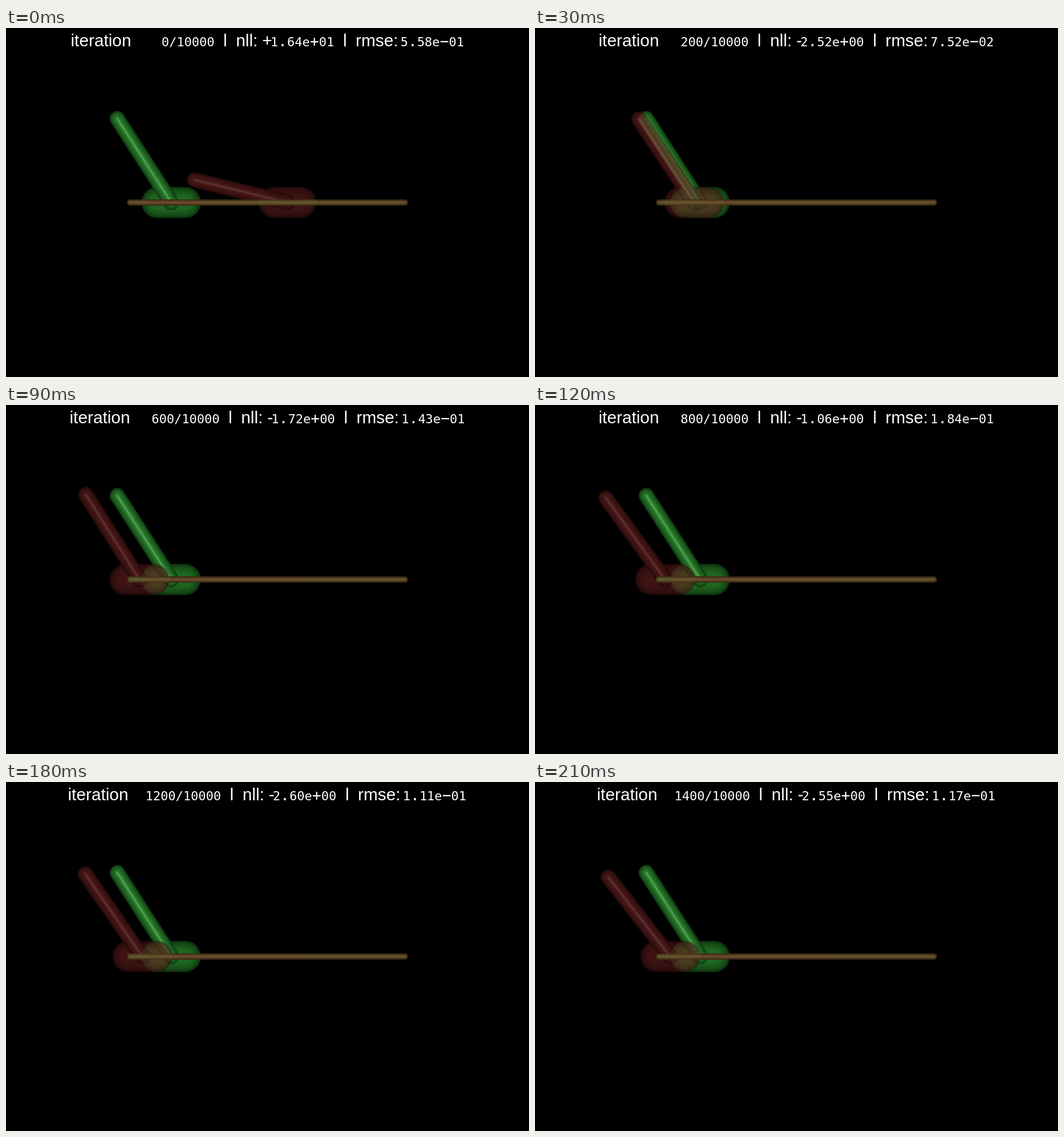
Write an HTML page that moves like this. It is 917 by 611 pixels and loops after 1.24 s.

```html
<!DOCTYPE html>
<html lang="en">
<head>
<meta charset="utf-8">
<title>Cart and pole fit</title>
<style>
  html, body { margin: 0; width: 100%; height: 100%; overflow: hidden; background: #000; }
  svg { display: block; width: 100vw; height: 100vh; }
  text { font: 29.8px "Liberation Sans", Arial, sans-serif; fill: #fff; white-space: pre; }
  .digit { font: 22px "DejaVu Sans Mono", monospace; }
  .mark { font: 26.5px "DejaVu Sans Mono", monospace; }
</style>
</head>
<body>
<svg id="stage" viewBox="0 0 917 611"></svg>
<script>
const stage = document.getElementById('stage');
const STEP = 30, LOOP = 1240, BASE_Y = 305.5;

// Red cart centre, pole tip, and the two printed errors for each step.
const steps = [
  [493.5, 330.5, 265.8, '+1.64e+01', '5.58e−01'],
  [279, 182, 159.5, '-2.52e+00', '7.52e−02'],
  [240, 155.5, 151.5, '-2.37e+00', '1.02e−01'],
  [234, 140, 157, '-1.72e+00', '1.43e−01'],
  [228, 124.5, 163, '-1.06e+00', '1.84e−01'],
  [241, 149.5, 155.8, '-2.66e+00', '1.05e−01'],
  [239, 139, 161, '-2.60e+00', '1.11e−01'],
  [237, 128.5, 166.8, '-2.55e+00', '1.17e−01']
];

// Shades run from the rim to the axis: [position, r, g, b].
const green = {
  cart: [[0, 12, 48, 14], [.2, 21, 75, 23], [.55, 30, 99, 32], [1, 35, 110, 37]],
  pole: [[0, 14, 54, 16], [.3, 27, 89, 29], [.7, 37, 114, 39], [.87, 48, 130, 50], [1, 84, 160, 84]]
};
const red = {
  cart: [[0, 50, 15, 15], [.2, 82, 25, 25], [.55, 102, 31, 31], [1, 112, 35, 35]],
  pole: [[0, 58, 17, 17], [.3, 94, 29, 29], [.7, 114, 36, 36], [.87, 127, 50, 50], [1, 155, 86, 86]]
};
const brown = [[0, 48, 36, 17], [.35, 75, 57, 28], [.65, 86, 67, 35], [1, 110, 88, 52]];

function add(parent, tag, attrs = {}) {
  const node = document.createElementNS('http://www.w3.org/2000/svg', tag);
  for (const key in attrs) node.setAttribute(key, attrs[key]);
  return parent.appendChild(node);
}

function shade(stops, u) {
  let i = 1;
  while (i < stops.length - 1 && stops[i][0] < u) i++;
  const a = stops[i - 1], b = stops[i];
  const k = (u - a[0]) / (b[0] - a[0]);
  return `rgb(${[1, 2, 3].map(c => Math.round(a[c] + (b[c] - a[c]) * k))})`;
}

// A lit rod: nested round strokes from the dark rim to the bright axis.
function capsule(parent, radius, stops, layers) {
  const g = add(parent, 'g', { 'stroke-linecap': 'round' });
  for (let i = 0; i < layers; i++) {
    const u = i / (layers - 1);
    add(g, 'line', { 'stroke-width': 2 * radius * (1 - u * .94), stroke: shade(stops, u) });
  }
  return (x1, y1, x2, y2) => {
    for (const line of g.children) {
      line.setAttribute('x1', x1);
      line.setAttribute('y1', y1);
      line.setAttribute('x2', x2);
      line.setAttribute('y2', y2);
    }
  };
}

const halfWidth = x => 50.5 + (493.5 - x) * .0075;

function cartPole(colors, opacity) {
  const g = add(stage, 'g', { opacity });
  const cart = capsule(g, 27.3, colors.cart, 28);
  const pole = capsule(g, 13.5, colors.pole, 18);
  return (x, tipX, tipY) => {
    const reach = halfWidth(x) - 27.3;
    cart(x - reach, BASE_Y, x + reach, BASE_Y);
    pole(x, BASE_Y, tipX, tipY);
  };
}

function tint(fill) {
  const rect = add(stage, 'rect', { y: 300.5, height: 10, fill, opacity: .15 });
  return x => {
    const left = Math.max(213, x - halfWidth(x));
    rect.setAttribute('x', left);
    rect.setAttribute('width', x + halfWidth(x) - left);
  };
}

const drawTruth = cartPole(green, 1);
const drawGuess = cartPole(red, .6);
capsule(stage, 5.5, brown, 10)(217.5, BASE_Y, 699.5, BASE_Y);
const tintTruth = tint('#7a3028');
const tintGuess = tint('#667040');
drawTruth(289.7, 195.2, 158.8);
tintTruth(289.7);

const label = (content, anchor = 'start') => {
  const node = add(stage, 'text', { y: 32, 'text-anchor': anchor });
  node.textContent = content;
  return node;
};
const title = label('iteration'), count = label('', 'end');
const bar1 = label('l', 'middle'), nll = label('nll:'), sign = label(''), nllValue = label('', 'end');
const bar2 = label('l', 'middle'), rmse = label('rmse:'), rmseValue = label('', 'end');

// Points and signs are set larger than the digits.
function setNumber(node, value) {
  node.textContent = '';
  for (const part of value.split(/([.+−])/)) {
    const span = add(node, 'tspan', { class: /[.+−]/.test(part) ? 'mark' : 'digit' });
    span.textContent = part;
  }
}

function place(node, x) { node.setAttribute('x', x); }

function setText(n, nllText, rmseText) {
  const iteration = n * 200;
  const [start, end] = n === 0 ? [113.5, 365.5] : iteration < 1000 ? [111.5, 374.5] : [108.5, 377];
  const plus = nllText[0] === '+';
  const first = end + 18.8, second = first + (plus ? 210 : 202.5);
  place(title, start);
  place(count, end);
  place(bar1, first);
  place(nll, first + 19);
  place(sign, first + 65);
  place(nllValue, second - 19);
  place(bar2, second);
  place(rmse, second + 18.8);
  place(rmseValue, second + 208.8);
  sign.textContent = nllText[0];
  setNumber(count, iteration + '/10000');
  setNumber(nllValue, nllText.slice(1));
  setNumber(rmseValue, rmseText);
}

let shown = -1;
function render(time) {
  const n = Math.min(steps.length - 1, Math.floor((time % LOOP) / STEP));
  if (n === shown) return;
  shown = n;
  const [x, tipX, tipY, nllText, rmseText] = steps[n];
  drawGuess(x, tipX, tipY);
  tintGuess(x);
  setText(n, nllText, rmseText);
}

const begin = performance.now();
function tick() {
  render(performance.now() - begin);
  requestAnimationFrame(tick);
}
tick();
</script>
</body>
</html>
```
